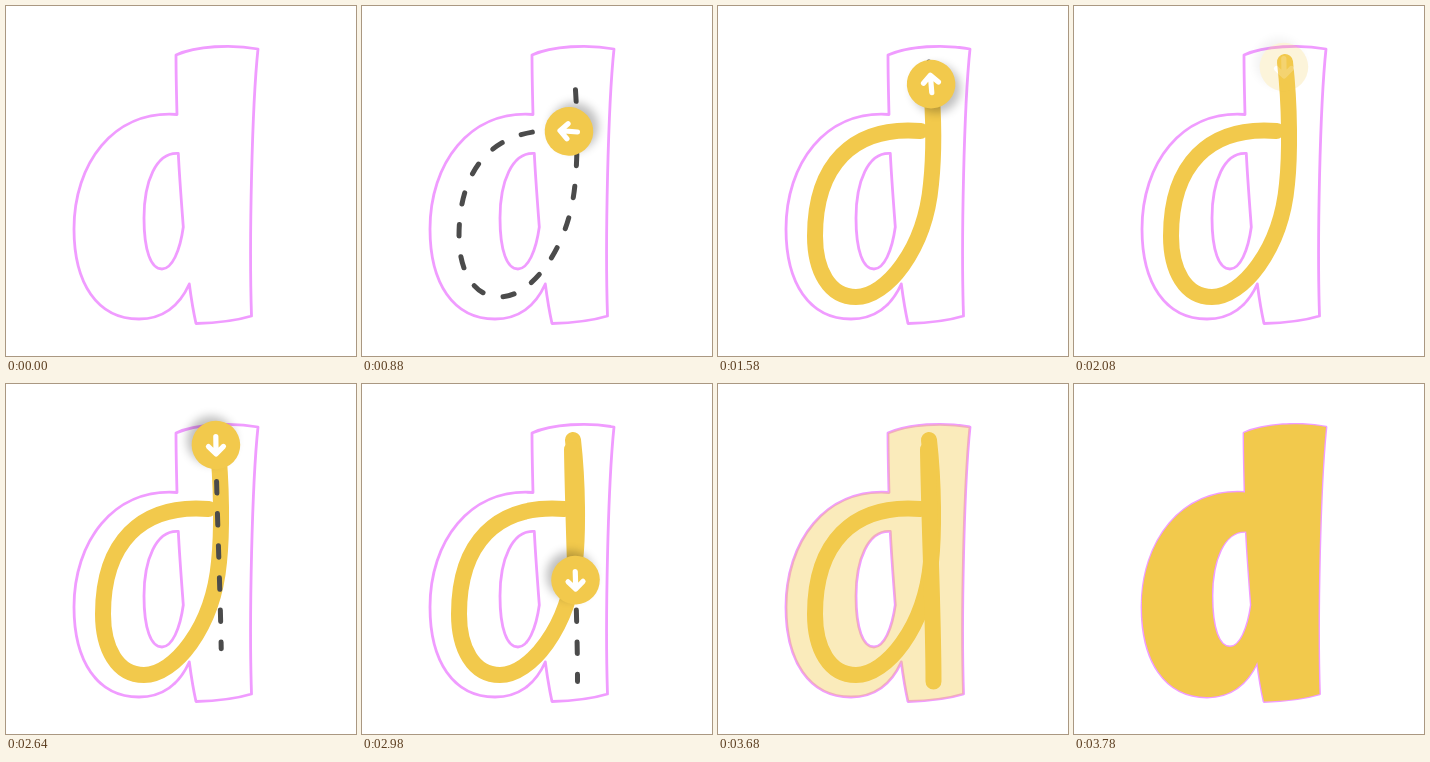
Write an HTML page that moves like this. It is 350 px wide and 350 px high and loops after 4.8 s.

```html
<!DOCTYPE html>
<html lang="en">
<head>
<meta charset="utf-8">
<title>Letter tracing</title>
<style>
  html, body { margin: 0; width: 100%; height: 100%; overflow: hidden; background: #fff; }
  svg { display: block; width: 100vw; height: 100vh; }
  path { fill: none; stroke-linecap: round; stroke-linejoin: round; }
  #outline { stroke: #f09cff; stroke-width: 2.8; }
  #solid { fill: #f2c94c; fill-rule: evenodd; }
  .guide { stroke: #4b4b4b; stroke-width: 5; }
  .ink { stroke: #f2c94c; stroke-width: 16; }
  .arrow { stroke: #fff; stroke-width: 5.2; }
</style>
</head>
<body>
<svg viewBox="0 0 350 350" xmlns="http://www.w3.org/2000/svg">
  <defs>
    <filter id="soft" x="-60%" y="-60%" width="220%" height="220%">
      <feGaussianBlur stdDeviation="5"/>
    </filter>
  </defs>
  <path id="outline" d="M170 49 C190 40 226 38 252 43 C246 100 243 235 245.5 310
    C229 315 210 317 190 317.5 C187 304 185 291 183.3 278
    C172 303 154 313 133 313 C91 313 68 277 68 223 C68 158 107 104 171 108.5
    C170.5 89 170 69 170 49 Z
    M172.3 147.5 C150 146 138 176 138 212 C138 245 145 263 156 263
    C166 263 174 245 177.3 221 C175.5 197 173.5 172 172.3 147.5 Z"/>
  <g id="strokes"></g>
  <path id="solid"/>
</svg>
<script>
const LOOP = 4800, STEP = 20, LAG = 4.5;
const DASH = 11.5, TAIL = 7.5;

const clamp = v => Math.max(0, Math.min(1, v));
const span = (t, [a, b]) => clamp((t - a) / (b - a));
const sine = u => (1 - Math.cos(Math.PI * u)) / 2;
const quad = u => u < .5 ? 2 * u * u : 1 - 2 * (1 - u) ** 2;

const layer = document.getElementById('strokes');
const solid = document.getElementById('solid');
solid.setAttribute('d', document.getElementById('outline').getAttribute('d'));

function add(parent, tag, attrs) {
  const el = document.createElementNS('http://www.w3.org/2000/svg', tag);
  for (const k in attrs) el.setAttribute(k, attrs[k]);
  return parent.appendChild(el);
}

function makeStroke(d, times) {
  const guide = add(layer, 'path', { class: 'guide', d });
  const ink = add(layer, 'path', { class: 'ink', d });
  const disc = add(layer, 'g', {});
  add(disc, 'circle', { cx: -5, cy: 5, r: 24, fill: '#000', opacity: .25, filter: 'url(#soft)' });
  add(disc, 'circle', { r: 24.3, fill: '#f2c94c' });
  add(disc, 'path', { class: 'arrow', d: 'M-8.5 0 H8.5 M1.5 -7.5 L9 0 L1.5 7.5' });
  const length = ink.getTotalLength();
  const period = (length - TAIL) / Math.round((length - TAIL) / 32);
  return { guide, ink, disc, length, period, ...times };
}

const strokes = [
  makeStroke('M202.5 125 C134 119.5 97 160 97 230 C97 264 111 291 138 291 ' +
    'C168 291 207 244 213 178 C216 150 216 100 211 56',
    { show: [40, 140], draw: [370, 980], move: [952, 1664], hide: [1820, 1940] }),
  makeStroke('M210 65.5 C211 140 215.5 230 215.5 297.5',
    { show: [2060, 2160], draw: [2420, 2720], move: [2728, 3184], hide: [3360, 3480] })
];

function setVisible(el, on) {
  el.style.display = on ? '' : 'none';
}

// Dashes up to the given distance, then nothing
function dashesTo(end, period, length) {
  const list = [];
  for (let s = 0; s < end; s += period) {
    const dash = Math.min(DASH, end - s);
    list.push(dash, s + period < end ? period - dash : length * 2);
  }
  return list.join(' ');
}

function drawStroke(s, t) {
  const drawn = quad(span(t, s.draw)) * s.length;
  setVisible(s.guide, drawn > 0);
  if (drawn > 0) s.guide.setAttribute('stroke-dasharray', dashesTo(drawn, s.period, s.length));

  const tip = sine(span(t, s.move)) * s.length;
  setVisible(s.ink, tip > 0);
  s.ink.setAttribute('stroke-dasharray', `${tip} ${s.length * 2}`);

  const alpha = span(t, s.show) * (1 - span(t, s.hide));
  setVisible(s.disc, alpha > 0);
  const p = s.ink.getPointAtLength(tip);
  const a = s.ink.getPointAtLength(Math.max(0, tip - 1));
  const b = s.ink.getPointAtLength(Math.min(s.length, tip + 1));
  const angle = Math.atan2(b.y - a.y, b.x - a.x);
  const x = p.x - LAG * Math.cos(angle), y = p.y - LAG * Math.sin(angle);
  s.disc.setAttribute('transform', `translate(${x} ${y}) rotate(${angle * 180 / Math.PI})`);
  s.disc.setAttribute('opacity', alpha);
}

function render(time) {
  const t = Math.floor(time % LOOP / STEP) * STEP;
  strokes.forEach(s => drawStroke(s, t));
  solid.setAttribute('opacity', span(t, [3620, 3780]));
}

let start;
function tick(now) {
  start ??= now;
  render(now - start);
  requestAnimationFrame(tick);
}
render(0);
requestAnimationFrame(tick);
</script>
</body>
</html>
```
